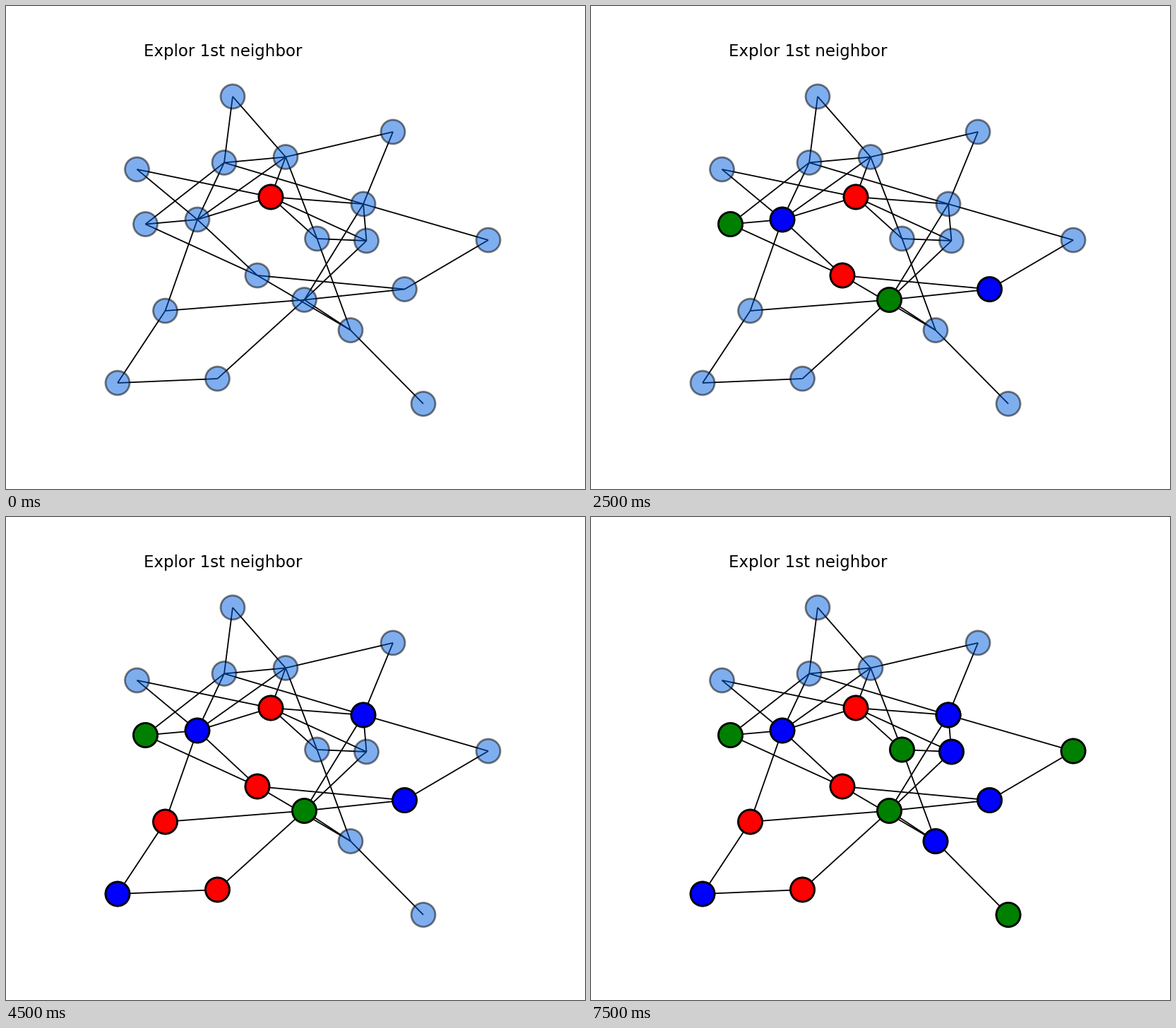
These frames come from a looping animation (820 px wide and 683 px high, 8000 ms). A matplotlib script:

```python
import matplotlib.pyplot as plt
from matplotlib.animation import FuncAnimation
from matplotlib.collections import LineCollection
from matplotlib.patches import Circle

W, H, DPI = 820, 683, 100
STEP_MS = 500
RADIUS = 17
RIM = 2

NODES = {
    "a": (321, 128), "b": (548, 178), "c": (396, 213.5), "d": (309, 221.5),
    "e": (185.5, 231), "f": (375, 270), "g": (506, 280), "h": (271, 302),
    "i": (197.5, 308.5), "j": (440.5, 329), "k": (510.5, 332),
    "l": (683, 331), "m": (356, 381), "n": (564.5, 400.5),
    "o": (422.5, 415.5), "p": (225.5, 431), "q": (488, 458.5),
    "r": (299.5, 527), "s": (158, 533), "t": (591, 562.5),
}
EDGES = ("ad ac bc bg cd cf ch cj dg dh di ef eh fg fh fj fk gl gk go "
         "hi hm hp im jk jq ko ln mn mq no op oq or ps qt rs").split()

# One visit per step: node and the colour it receives
VISITS = "fr hb ig mr nb og rr sb pr gb kb qb tg jg lg gb".split()
COLORS = {"r": "red", "g": "green", "b": "blue"}

# The small margin keeps the pixel size from rounding down
fig = plt.figure(figsize=((W + 0.01) / DPI, (H + 0.01) / DPI), dpi=DPI,
                 facecolor="white")
ax = fig.add_axes([0, 0, 1, 1])
ax.set_xlim(0, W)
ax.set_ylim(H, 0)
ax.axis("off")


def add_node(name, color, z, alpha=None):
    disc = Circle(NODES[name], RADIUS, facecolor=color, edgecolor="black",
                  linewidth=RIM, alpha=alpha, zorder=z)
    return ax.add_patch(disc)


ax.text(195, 70.5, "Explor 1st neighbor", family="DejaVu Sans", fontsize=16.5)
ax.add_collection(LineCollection([(NODES[u], NODES[v]) for u, v in EDGES],
                                 colors="black", linewidths=1.3, zorder=1))
for name in NODES:
    add_node(name, (0, 0.37, 0.87), 2, alpha=0.5)
visited = [add_node(name, COLORS[key], 3) for name, key in VISITS]


def update(step):
    for i, disc in enumerate(visited):
        disc.set_visible(i <= step)
    return visited


anim = FuncAnimation(fig, update, frames=len(VISITS), interval=STEP_MS,
                     repeat=True, repeat_delay=0)
plt.show()
```
